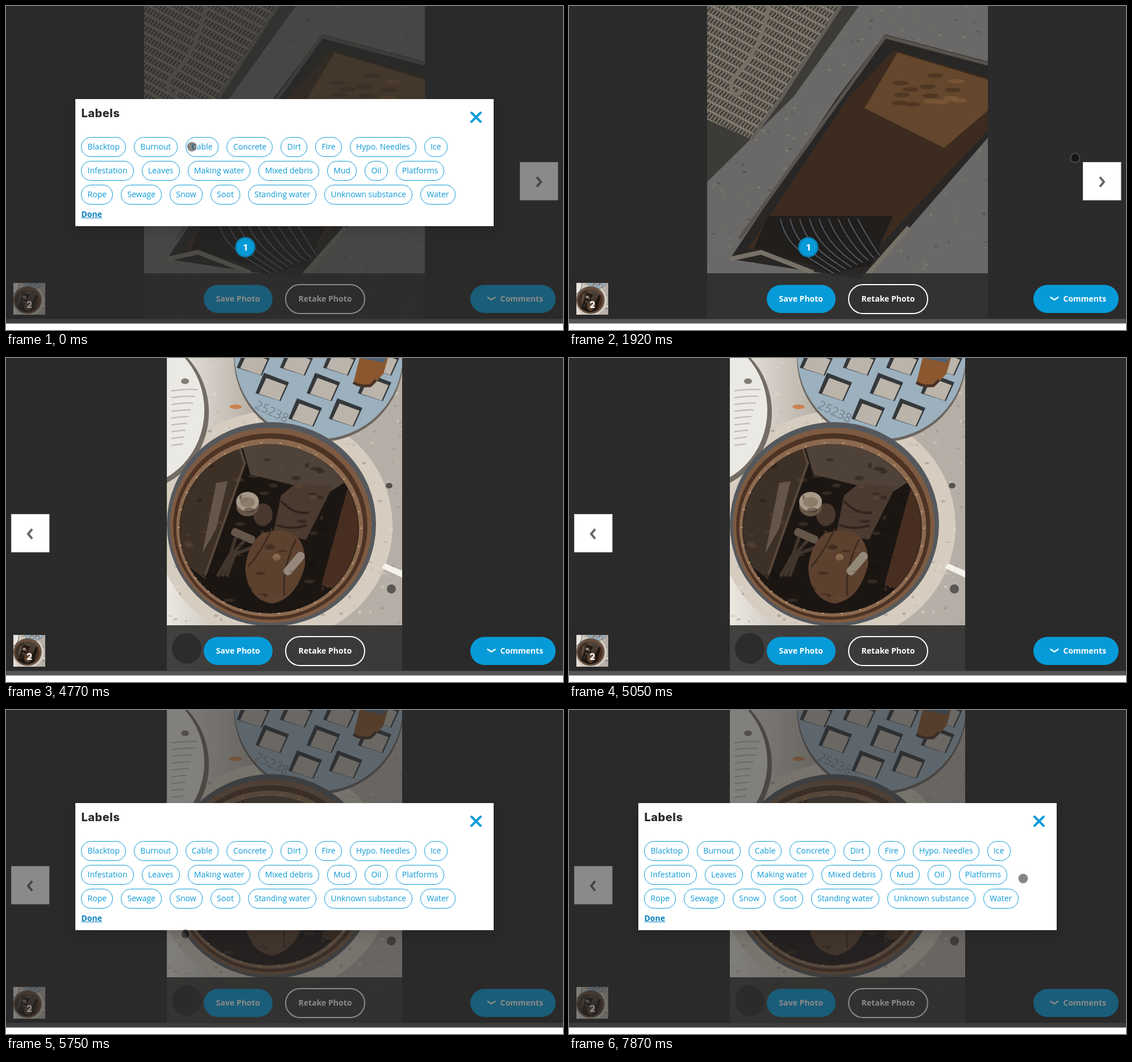
Animation of 980 by 571 pixels, one loop 7.99 s. Source, as an HTML page:

```html
<!DOCTYPE html>
<html lang="en">
<head>
<meta charset="utf-8">
<title>Photo labels</title>
<style>
html, body { margin: 0; width: 100%; height: 100%; overflow: hidden; background: #fff; }
#stage { position: absolute; left: 0; top: 0; width: 980px; height: 571px; overflow: hidden; font: 14px "Open Sans", "Noto Sans", sans-serif; }
#stage > svg { position: absolute; left: 0; top: 0; }
.btn { font-weight: 700; font-size: 14px; fill: #fff; text-anchor: middle; }
.num { font: 800 15px Inter, sans-serif; fill: #fff; text-anchor: middle; }
#modal { position: absolute; left: 122px; top: 164px; width: 736px; height: 224px; background: #fff; box-shadow: 0 8px 22px rgba(0,0,0,.14); }
h1 { position: absolute; left: 10.5px; top: 13px; margin: 0; font: 800 20px/24px Inter, sans-serif; letter-spacing: .5px; color: #2b2b2b; }
#rows { position: absolute; left: 10.4px; top: 67px; display: grid; gap: 7px; }
.row { display: flex; gap: 14px; }
.chip { box-sizing: border-box; height: 35px; padding: 0 10.2px; border: 1.8px solid #0d9bd8; border-radius: 18px; line-height: 31px; color: #0d9bd8; white-space: nowrap; }
.chip svg { display: none; margin-left: 9px; }
.on { background: #0d9bd8; color: #fff; }
.on svg { display: inline; }
#done { position: absolute; left: 10.5px; top: 193px; font-weight: 700; line-height: 20px; color: #0a7fbe; text-decoration: underline; }
#close { position: absolute; left: 694px; top: 20.5px; }
</style>
</head>
<body>
<div id="stage">
  <svg id="scene" width="980" height="571"></svg>
  <div id="modal">
    <h1>Labels</h1>
    <svg id="close" width="22" height="22"><path d="M3 3L19 19M19 3L3 19" stroke="#0d9bd8" stroke-width="4" stroke-linecap="round"/></svg>
    <div id="rows"></div>
    <div id="done">Done</div>
  </div>
  <svg width="980" height="571"><circle id="cursor" r="8" fill="#000" fill-opacity=".48" stroke="#888" stroke-opacity=".4" stroke-width="2"/></svg>
</div>
<script>
const $ = id => document.getElementById(id);
const BLUE = '#069bd8', DARK = '#2b2b2b';
let seed = 7;
const rnd = () => (seed = seed * 16807 % 2147483647) / 2147483647;
const poly = (pts, fill) => `<polygon points="${pts}" fill="${fill}"/>`;
const oval = (x, y, rx, ry, fill, extra = '') => `<ellipse cx="${x}" cy="${y}" rx="${rx}" ry="${ry}" fill="${fill}" ${extra}/>`;
const rect = (x, y, w, h, fill, extra = '') => `<rect x="${x}" y="${y}" width="${w}" height="${h}" fill="${fill}" ${extra}/>`;
const line = (d, color, w, extra = '') => `<path d="${d}" fill="none" stroke="${color}" stroke-width="${w}" ${extra}/>`;
const repeat = (n, f) => Array.from({ length: n }, (_, i) => f(i)).join('');
const specks = (n, x, w, colors) => repeat(n, i =>
  oval(x + rnd() * w, rnd() * 551, 1 + rnd() * 3, .8 + rnd() * 2, colors[i % colors.length], 'opacity=".45"'));

// Street vault with a grate and cables
function vault() {
  const cable = i => {
    const x = 372 + i * 17, d = `M${x} 375C${x + 10} ${420 - i * 3} ${x + 35} 435 ${x + 95 - i * 7} ${472 - i * 4}`;
    return line(d, '#1d1e1f', 9) + line(d, '#55565a', 2);
  };
  return rect(243, 0, 494, 551, '#6a6967') +
    specks(300, 243, 494, ['#8a8782', '#454443', '#918d85']) +
    poly('243,0 510,0 395,160 243,310', '#3d3b38') +
    poly('243,0 478,0 372,164 320,235 243,200', 'url(#grate)') +
    line('M478 0L372 164L320 235', '#625e57', 6) +
    line('M352 -4C342 60 320 95 290 125C274 160 304 162 303 147', '#756f65', 7) +
    poly('556,50 737,98 737,232 520,482 283,446 470,164', '#292725') +
    poly('572,78 737,127 737,220 508,462 315,428 490,164', '#3c2b1e') +
    poly('578,82 737,130 737,184 660,250 520,180', '#64472d') +
    repeat(14, () => oval(580 + rnd() * 120, 120 + rnd() * 55, 14, 4, rnd() < .5 ? '#835e3a' : '#422d1c', 'opacity=".6"')) +
    poly('350,370 570,370 530,458 470,468 325,428', '#211e1b') + repeat(9, cable) +
    line('M300 410L556 54L737 102', '#57534d', 6) +
    line('M283 446L338 434L430 470M598 390L510 490', '#777168', 8);
}

// Open round manhole with its covers
function manhole() {
  const slot = (x, y) => `<g transform="translate(${x} ${y})">` +
    poly('-14,-26 30,-9 15,24 -29,10', '#34383b') + poly('-10,-17 25,-4 13,23 -23,11', '#bbb4aa') + '</g>';
  const slots = r => repeat(r + 2, i => slot([526, 468, 435][r] + [71, 90, 76][r] * i, 97 - 45 * r));
  const rings = ['#55595d', '#7d5b42', '#4d3324', '#8d6a4f', '#1c1613'];
  return rect(283, 0, 414, 551, 'url(#stone)') +
    oval(472, 296, 208, 203, '#d6cdc0') +
    specks(400, 283, 414, ['#e6dfd3', '#8d867d', '#c2b8aa']) +
    oval(404, 86, 11, 4, '#c9834f') +
    oval(225, 96, 132, 138, '#736c64') + oval(221, 92, 128, 135, '#ebe9e4') +
    repeat(9, i => line(`M291 ${58 + i * 12}q30 -4 ${46 - i * 4} -2`, '#b9b6b0', 2)) +
    oval(315, 41, 7, 5, '#847d74') +
    oval(550, 0, 149, 148, '#6b655f') + oval(550, -4, 148, 147, '#9cb0be') +
    repeat(3, slots) +
    '<text x="436" y="88" font-size="22" fill="#77828b" transform="rotate(25 436 88)">25238</text>' +
    poly('622,0 672,0 664,28 641,52 611,45', '#8b572f') + line('M611 43Q624 52 642 48L651 39', '#493126', 5) +
    poly('622,0 670,0 664,8', '#4e6176') +
    rings.map((c, i) => oval(467 - i, 293 + i * 2, 184 - i * 6.5, 180 - i * 7.7, c)).join('') +
    '<g clip-path="url(#pit)">' +
    poly('300,210 410,158 422,184 350,390 300,350', '#3d3026') +
    poly('370,220 390,217 370,300 345,345', '#65564a') +
    line('M412 160L420 186L350 384', '#59483a', 4) +
    poly('414,150 510,145 610,210 565,239 430,205', '#4f4239') +
    poly('602,226 632,230 632,350 586,410 555,400', '#472e20') +
    repeat(3, i => line(`M${408 + i * 14} ${305 + i * 14}L${395 + i * 4} 345L${372 + i * 8} 385`, '#42352c', 6)) +
    rect(400, 298, 44, 14, '#65564a', 'rx="5" transform="rotate(24 400 298)"') +
    oval(452, 276, 17, 20, '#49382e') +
    oval(425, 261, 20, 18, '#665747') + oval(425, 253, 20, 17, '#a89a88') + oval(425, 254, 13, 9, '#8c7d6b') +
    poly('509,222 575,226 528,320 470,310 484,242', '#4b3a30') +
    line('M484 252Q508 278 533 272M476 294Q500 304 529 295', '#2f241d', 4) +
    '<path d="M448 311Q477 297 505 309Q528 325 526 365Q512 424 468 433Q424 425 421 370Q425 330 448 311Z" fill="#5d412f"/>' +
    line('M468 300Q450 340 426 368M510 320Q484 375 490 419', '#3c2b21', 3) +
    oval(476, 351, 7, 6, '#8a6a50') +
    rect(483, 355, 49, 15, '#94887b', 'rx="7" transform="rotate(-50 507 363)"') +
    repeat(60, () => oval(320 + rnd() * 290, 170 + rnd() * 260, 2 + rnd() * 8, 1 + rnd() * 4, rnd() < .5 ? '#15110e' : '#66513f', 'opacity=".35"')) +
    '</g>' +
    repeat(90, i => oval(464 + 160 * Math.cos(i * .07), 300 + 151 * Math.sin(i * .07), 1.8, 1.4, i % 3 ? '#786553' : '#b59a7b')) +
    oval(674, 225, 6, 5, '#55514d') + oval(678, 407, 8, 8, '#5b5754') +
    poly('667,362 697,375 697,387 661,370', '#f5f2eb') +
    oval(318, 512, 26, 27, '#3c3835');
}

const navBox = (id, x, tip, back) => `<g id="${id}">` + rect(x, 275.5, 66.5, 66.5, '#fff', 'stroke="#ddd"') +
  line(`M${tip + back} 301.5L${tip} 310L${tip + back} 318.5`, '#666', 4) + '</g>';
const button = (x, w, mid, text) => rect(x, 491.5, w, 49.5, BLUE, 'rx="24.7"') + label(mid, text);
const label = (x, text) => `<text class="btn" x="${x}" y="521">${text}</text>`;

$('scene').innerHTML = `<defs>
  <pattern id="grate" width="6" height="15" patternUnits="userSpaceOnUse" patternTransform="rotate(28) skewX(-12)">
    ${rect(0, 0, 6, 15, '#403c37') + rect(0, 0, 6, 4, '#8a8375') + rect(0, 0, 3, 15, '#746e64')}</pattern>
  <linearGradient id="stone"><stop stop-color="#ece8e1"/><stop offset=".35" stop-color="#bab3aa"/><stop offset="1" stop-color="#b5aea6"/></linearGradient>
  <clipPath id="pit">${oval(463, 301, 157, 149, '#000')}</clipPath>
  <clipPath id="wide">${rect(243, 0, 494, 551, '#000')}</clipPath>
  <clipPath id="tall">${rect(283, 0, 414, 551, '#000')}</clipPath>
  <g id="hole" clip-path="url(#tall)">${manhole()}</g></defs>` +
  rect(0, 0, 980, 552, DARK) +
  `<g id="first" clip-path="url(#wide)">${vault()}</g><use id="second" href="#hole"/>` +
  rect(0, 471, 980, 81, DARK, 'fill-opacity=".88"') +
  navBox('prev', 9.5, 39, 7) + navBox('next', 904.5, 941, -7) +
  '<svg x="13" y="488" width="56" height="56" viewBox="283 70 414 414"><use href="#hole"/></svg>' +
  '<text class="num" x="41" y="531.5" style="font-size:16px">2</text>' +
  button(348, 121, 408.3, 'Save Photo') + button(817, 150, 907.3, 'Comments') +
  rect(492, 491, 139, 51, 'none', 'rx="25.5" stroke="#fff" stroke-width="2"') + label(561.5, 'Retake Photo') +
  line('M847.5 513.5L854 517.8L860.5 513.5', '#fff', 2.5, 'stroke-linecap="round" stroke-linejoin="round"') +
  rect(0, 551.5, 980, 8, '#555') +
  rect(0, 0, 980, 559.5, DARK, 'id="dim"') +
  '<g id="marker">' + oval(0, 0, 16.2, 16.2, BLUE, 'stroke="#0a83b8" stroke-width="3"') +
  '<text class="num" y="5.5">1</text></g>';

const cross = '<svg width="10" height="10"><path d="M1 1L9 9M9 1L1 9" stroke="#fff" stroke-width="2.3"/></svg>';
$('rows').innerHTML = [
  'Blacktop,Burnout,Cable,Concrete,Dirt,Fire,Hypo. Needles,Ice',
  'Infestation,Leaves,Making water,Mixed debris,Mud,Oil,Platforms',
  'Rope,Sewage,Snow,Soot,Standing water,Unknown substance,Water'
].map(names => '<div class="row">' + names.split(',').map(n => `<div class="chip" id="${n}">${n}${cross}</div>`).join('') + '</div>').join('');

const LOOP = 7990, FIRST = 120, STEP = 138.3;
const PICK = 250, CLOSE = 1512, NEXT = 2745, TAP = 5000;
// Pointer moves: start, end, x, y
const moves = [
  [PICK, 1000, 872, 194], [1100, 1360, 840, 198], [1400, CLOSE, 829, 197], [1600, 2150, 929, 312],
  [NEXT, 3770, 415, 250], [3800, 4600, 418, 248], [5110, 5650, 316, 395], [5700, 6200, 268, 367],
  [6600, 7720, 764, 273], [7720, 7860, 799, 297]
];

const ramp = (t, from, span) => Math.max(0, Math.min(1, (t - from) / span));

function pointer(t) {
  let x = 327, y = 248;
  for (const [a, b, tx, ty] of moves) {
    const k = ramp(t, a, b - a), e = k * k * (3 - 2 * k);
    x += (tx - x) * e;
    y += (ty - y) * e;
  }
  return [x, y];
}

function draw(time) {
  // The screen refreshes in even steps
  const t = Math.max(0, FIRST + STEP * Math.floor((time - FIRST) / STEP));
  const late = t >= NEXT, tapped = t >= TAP;
  const show = (id, on) => { $(id).style.display = on ? '' : 'none'; };
  show('first', !late);
  show('next', !late);
  show('second', late);
  show('prev', late);
  const modal = late ? ramp(t, TAP, 205) : 1 - ramp(t, CLOSE, 275);
  $('modal').style.opacity = modal;
  $('dim').style.opacity = .55 * (late ? ramp(t, TAP, 100) : modal);
  $('marker').style.opacity = tapped || !late ? 1 : .6 - ramp(t, NEXT, 230) * .6;
  $('marker').setAttribute('transform', tapped ? 'translate(418 247.5)' : 'translate(421 425)');
  $('Cable').classList.toggle('on', t > PICK && !late);
  const [x, y] = pointer(t);
  $('cursor').setAttribute('cx', x);
  $('cursor').setAttribute('cy', y);
  $('cursor').style.opacity = tapped ? 1 : 1 - ramp(t, 4550, 150);
}

const start = performance.now();
function tick() {
  draw((performance.now() - start) % LOOP);
  requestAnimationFrame(tick);
}
tick();
</script>
</body>
</html>
```
